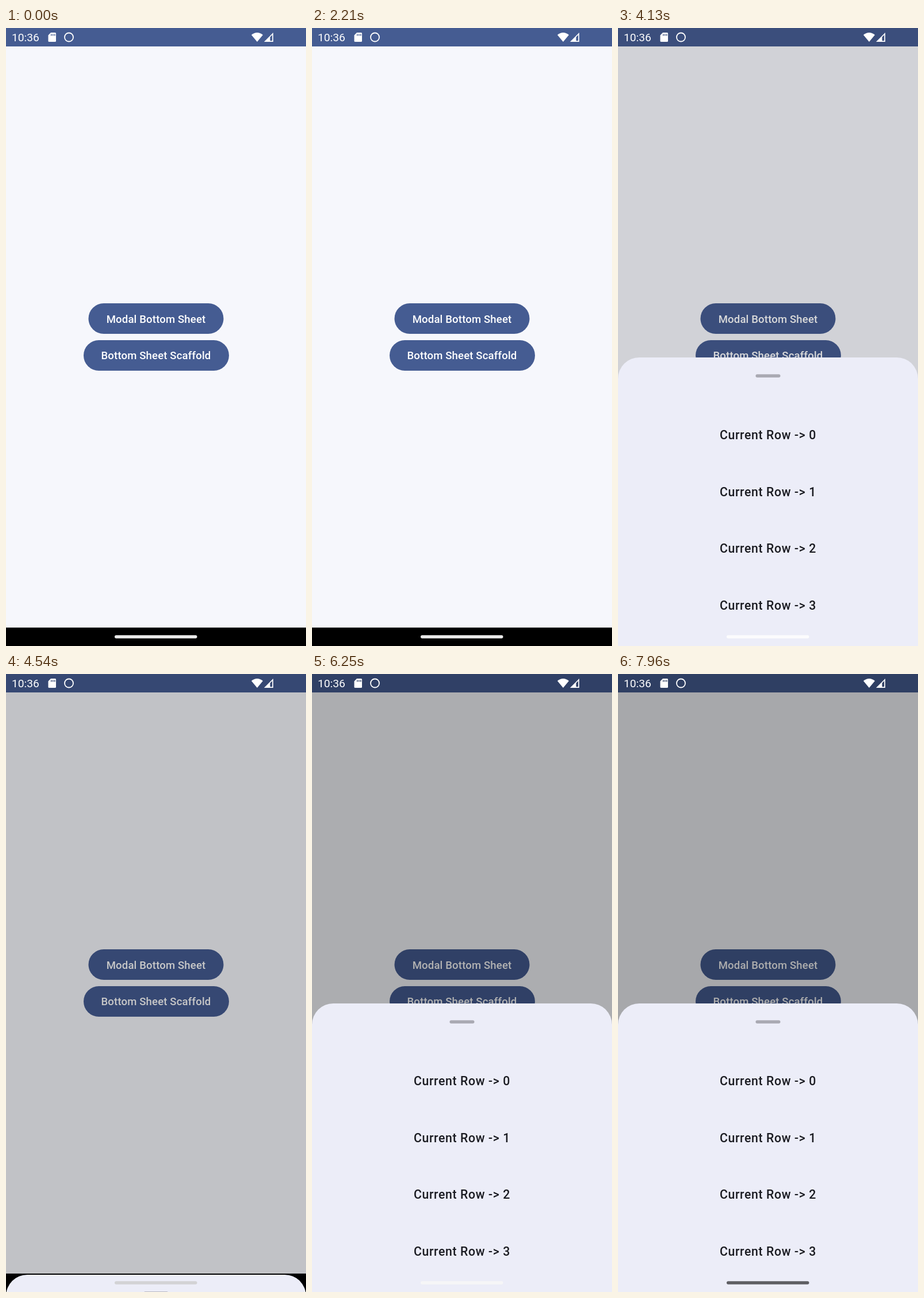
Write an HTML page that moves like this. It is 522x1073 px and loops after 8 s.

```html
<!DOCTYPE html>
<html lang="en">
<head>
<meta charset="utf-8">
<title>Bottom sheet demo</title>
<style>
  html, body { margin: 0; height: 100%; overflow: hidden; background: #000; }
  svg { display: block; width: 100vw; height: 100vh; }
  text { font-family: Roboto, sans-serif; }
  .label { font-size: 18.6px; font-weight: 500; letter-spacing: .13px; fill: #fff; text-anchor: middle; }
  .row { font-size: 21.3px; font-weight: 500; letter-spacing: .62px; fill: #1a1b21; text-anchor: middle; }
</style>
</head>
<body>
<svg viewBox="0 0 522 1073" preserveAspectRatio="none">
  <defs>
    <clipPath id="buttonClip"><rect x="143.5" y="478" width="235" height="53" rx="26.5"/></clipPath>
    <radialGradient id="glow">
      <stop offset="0" stop-color="#fff" stop-opacity=".9"/>
      <stop offset=".6" stop-color="#fff" stop-opacity=".6"/>
      <stop offset="1" stop-color="#fff" stop-opacity="0"/>
    </radialGradient>
  </defs>

  <rect width="522" height="1073"/>
  <rect width="522" height="1041" fill="#f6f7fc"/>
  <g fill="#455c92">
    <rect width="522" height="32"/>
    <rect x="143.5" y="478" width="235" height="53" rx="26.5"/>
    <rect x="135" y="542" width="253" height="53" rx="26.5"/>
  </g>
  <g clip-path="url(#buttonClip)">
    <g id="ripple">
      <circle id="wave" cx="250" cy="505" fill="url(#glow)"/>
      <g id="sparkles" fill="#fff"></g>
    </g>
  </g>
  <text class="label" x="261" y="511.5">Modal Bottom Sheet</text>
  <text class="label" x="261" y="575">Bottom Sheet Scaffold</text>

  <rect id="scrim" width="522" height="1041" opacity="0"/>

  <g fill="#fff">
    <text x="10" y="23" font-size="19.2">10:36</text>
    <path fill-rule="evenodd" d="M78 8H85.5Q87 8 87 9.500V22.500Q87 24 85.500 24H75Q73.500 24 73.500 22.500V12.500Z
      M78 10.500V13.500H79.500V10.500Z M81 10.500V13.500H82.500V10.500Z M84 10.500V13.500H85.500V10.500Z"/>
    <circle cx="109.500" cy="16" r="7.500" fill="none" stroke="#fff" stroke-width="1.800"/>
    <path d="M427 12Q437 4 447 12L437 24Z"/>
    <path fill-rule="evenodd" d="M449 24L465 8V24Z M459.500 15.800V22.300H463.300V12Z"/>
  </g>

  <g id="sheet">
    <path d="M0 1073V609A37 37 0 0 1 37 572H485A37 37 0 0 1 522 609V1073Z" fill="#ecedf8"/>
    <rect x="239.500" y="601.300" width="43" height="5.400" rx="2.700" fill="#a9a9b2"/>
    <g id="rows"></g>
  </g>
  <rect id="pill" x="189" y="1054.300" width="143.500" height="5.400" rx="2.700"/>
</svg>

<script>
const LOOP = 8000;
const SHEET_TRAVEL = 501;
const SCRIM_ALPHA = 0.32;
const RIPPLE_ALPHA = 0.22;

// Each step: start time and the value to move towards.
const sheetSteps = [[3938, 1], [4440, 0], [5970, 1]];
const scrimSteps = [[4030, 1], [4456, 0], [6035, 1]];
const pillSteps  = [[4022, 1], [4600, 0], [6027, 1]];
const taps = [3565, 5600];

const el = id => document.getElementById(id);
const clamp = v => Math.min(1, Math.max(0, v));

function addShape(parent, tag, attrs, content = '') {
  const node = document.createElementNS('http://www.w3.org/2000/svg', tag);
  for (const name in attrs) node.setAttribute(name, attrs[name]);
  node.textContent = content;
  parent.append(node);
}

for (let i = 0; i < 4; i++) {
  addShape(el('rows'), 'text', { class: 'row', x: 261, y: 714 + i * 98.5 }, `Current Row -> ${i}`);
}

let seed = 7;
const random = () => (seed = seed * 16807 % 2147483647) / 2147483647;
for (let i = 0; i < 60; i++) {
  const angle = random() * Math.PI * 2, radius = 38 + random() * 18;
  addShape(el('sparkles'), 'circle', {
    cx: 250 + radius * Math.cos(angle), cy: 505 + radius * Math.sin(angle), r: 0.6
  });
}

// cubic-bezier(.4, 0, .2, 1)
function fastOutSlowIn(x) {
  let low = 0, high = 1, s = 0.5;
  for (let i = 0; i < 20; i++) {
    s = (low + high) / 2;
    const at = 1.2 * (1 - s) ** 2 * s + 0.6 * (1 - s) * s * s + s ** 3;
    if (at < x) low = s; else high = s;
  }
  return 3 * (1 - s) * s * s + s ** 3;
}

// Critically damped spring
function spring(ms) {
  const x = ms * 0.045, rest = (1 + x) * Math.exp(-x);
  return rest < 0.002 ? 1 : 1 - rest;
}

const tween = duration => ms => fastOutSlowIn(clamp(ms / duration));

// Follows the steps, each one starting from wherever the previous one had got to.
function follow(steps, t, ease) {
  let value = 0;
  steps.forEach(([start, goal], i) => {
    if (t < start) return;
    const end = i + 1 < steps.length ? steps[i + 1][0] : Infinity;
    value += (goal - value) * ease(Math.min(t, end) - start);
  });
  return value;
}

function drawRipple(t) {
  const start = taps.find(tap => t >= tap && t < tap + 480);
  const ms = start === undefined ? 0 : t - start;
  const strength = clamp(ms / 50) * clamp((480 - ms) / 300);
  el('wave').setAttribute('r', 35 + 230 * fastOutSlowIn(clamp(ms / 450)));
  el('wave').setAttribute('opacity', RIPPLE_ALPHA * strength);
  el('sparkles').setAttribute('opacity', 0.3 * clamp(ms / 50) * clamp((180 - ms) / 80));
}

function drawPill(darkness) {
  const level = Math.round(255 * (1 - darkness) ** (1 / 2.2));
  el('pill').setAttribute('fill', `rgba(${level},${level},${level},${0.92 - 0.32 * darkness})`);
}

function draw(t) {
  const drop = Math.round(SHEET_TRAVEL * (1 - follow(sheetSteps, t, spring)));
  el('sheet').setAttribute('transform', `translate(0 ${drop})`);
  el('scrim').setAttribute('opacity', SCRIM_ALPHA * follow(scrimSteps, t, tween(300)));
  drawPill(follow(pillSteps, t, tween(1700)));
  drawRipple(t);
}

const begin = performance.now();
function tick() {
  draw((performance.now() - begin) % LOOP);
  requestAnimationFrame(tick);
}
tick();
</script>
</body>
</html>
```
